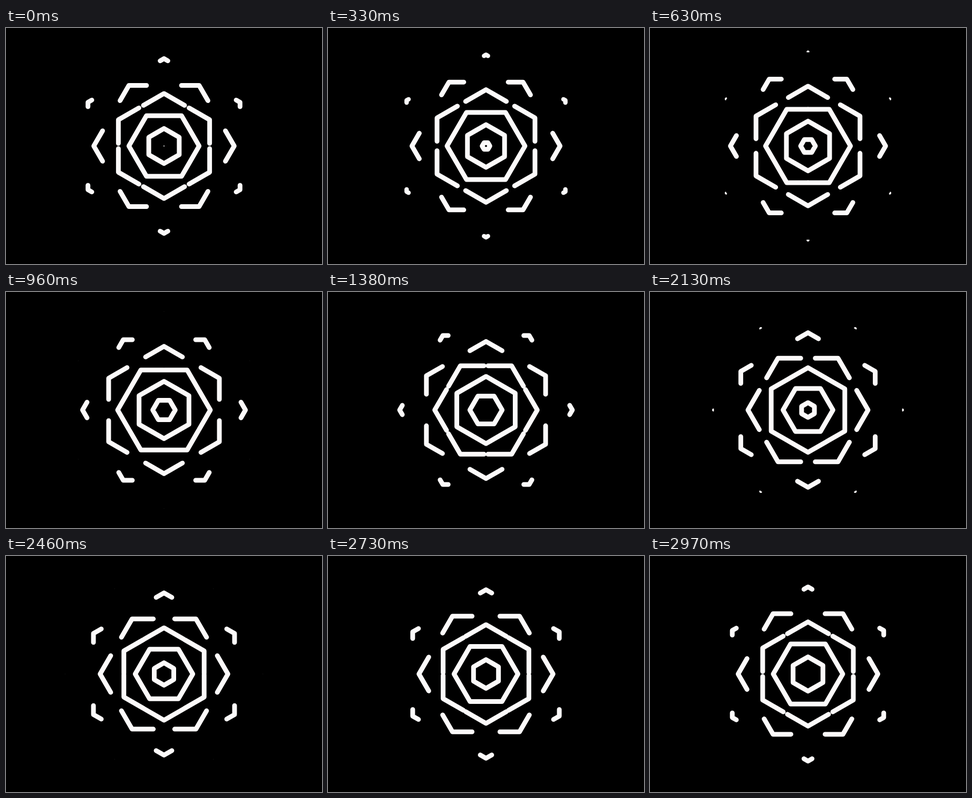
Write an HTML page with a canvas that moves like this. It is 600 px wide and 450 px high and loops after 3 s.

```html
<!DOCTYPE html>
<html lang="en">
<head>
<meta charset="utf-8">
<title>Hexagon ripples</title>
<style>
html, body { margin: 0; width: 100%; height: 100%; overflow: hidden; background: #000; }
canvas { display: block; }
</style>
</head>
<body>
<canvas id="stage" width="600" height="450"></canvas>
<script>
const ctx = document.getElementById('stage').getContext('2d');
const LOOP = 3000, BIRTH = 1500, GAP = 100 / 3;
const SPLIT = 77, END = 190, HALF = 4.5;

// Share of each side still drawn: 1 while whole, easing to 0 at END
function remaining(r) {
  const u = Math.min(1, Math.max(0, (r - SPLIT) / (END - SPLIT)));
  return (1 + Math.cos(Math.PI * u)) / 2;
}

function hexagon(r, turn) {
  const share = remaining(r) / 2;
  const point = n => {
    const a = n * Math.PI / 3 + turn;
    return [r * Math.cos(a), r * Math.sin(a)];
  };
  const toward = (p, q) => p.map((v, i) => v + (q[i] - v) * share);

  ctx.lineWidth = 2 * Math.min(HALF, r < 20 ? r : r * share);
  ctx.beginPath();
  for (let n = 0; n < 6; n++) {
    const corner = point(n);
    ctx.moveTo(...toward(corner, point(n - 1)));
    ctx.lineTo(...corner);
    ctx.lineTo(...toward(corner, point(n + 1)));
  }
  ctx.stroke();
}

function draw(now) {
  const t = now % LOOP;
  ctx.setTransform(1, 0, 0, 1, 0, 0);
  ctx.fillStyle = '#000';
  ctx.fillRect(0, 0, 600, 450);
  ctx.translate(300, 225);
  ctx.strokeStyle = '#fcfafa';
  ctx.lineCap = ctx.lineJoin = 'round';
  for (let k = -1; k < 6; k++) {
    const r = (t / BIRTH + k) * GAP;
    if (r >= 0 && r < END - 1) hexagon(Math.max(r, 0.4), k % 2 ? Math.PI / 6 : 0);
  }
  requestAnimationFrame(draw);
}
requestAnimationFrame(draw);
</script>
</body>
</html>
```
